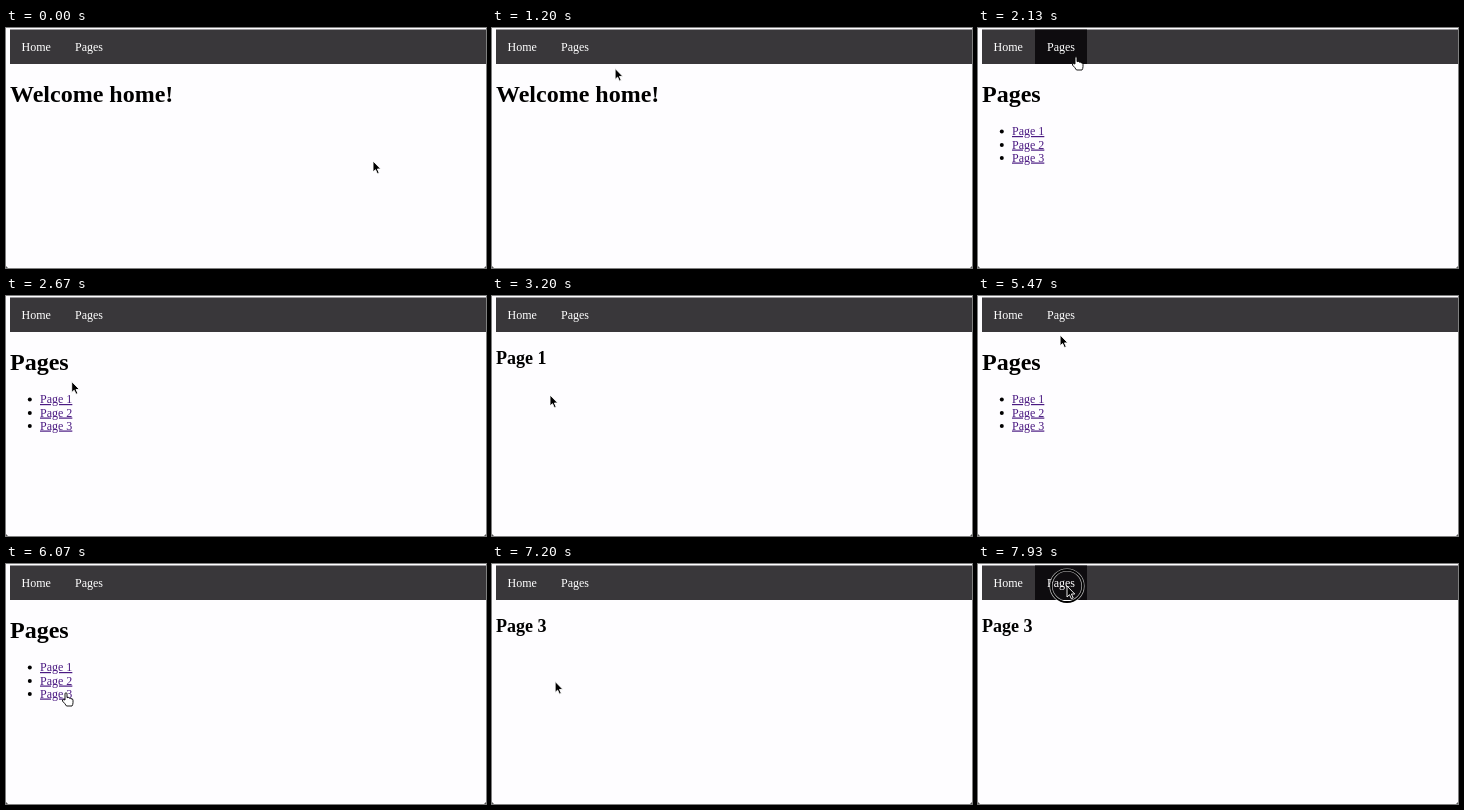
An HTML page for the animation above (8 s loop, 480 by 240 pixels).

```html
<!DOCTYPE html>
<html lang="en">
<head>
<meta charset="utf-8">
<title>Page navigation</title>
<style>
  html, body { margin: 0; width: 100%; height: 100%; overflow: hidden; background: #fefdff; }
  svg { display: block; width: 480px; height: 240px; font: 12px "Liberation Serif", Times, serif; }
  .nav { fill: #fff; }
  h1, .h1 { font-size: 24px; font-weight: bold; }
  .h2 { font-size: 18px; font-weight: bold; }
  .link { fill: #4b1a82; text-decoration: underline; }
</style>
</head>
<body>
<svg viewBox="0 0 480 240">
  <rect width="480" height="240" fill="#fefdff"/>
  <rect x="4" y="1.5" width="476" height="34.5" fill="#39373a"/>
  <rect id="hover" y="1.5" height="34.5" fill="#0e0c0f"/>
  <text class="nav" x="15.6" y="23">Home</text>
  <text class="nav" x="69" y="23">Pages</text>

  <g id="home"><text class="h1" x="4" y="73.5">Welcome home!</text></g>
  <g id="pages">
    <text class="h1" x="4" y="73.5">Pages</text>
    <circle cx="23.8" cy="103.5" r="2"/><text class="link" x="34" y="107">Page 1</text>
    <circle cx="23.8" cy="117" r="2"/><text class="link" x="34" y="120.5">Page 2</text>
    <circle cx="23.8" cy="130" r="2"/><text class="link" x="34" y="133.5">Page 3</text>
  </g>
  <g id="page1"><text class="h2" x="4" y="68">Page 1</text></g>
  <g id="page3"><text class="h2" x="4" y="68">Page 3</text></g>

  <path d="M0 238V240H2ZM480 238V240H478Z" fill="#555"/>

  <g id="pointer">
    <g id="ring" fill="none">
      <circle stroke="#fff" stroke-opacity=".7" stroke-width="3.2"/>
      <circle stroke="#000" stroke-width="1.8"/>
    </g>
    <path id="arrow" d="M0 0V11L2.5 8.7 4.3 12.7 6.2 11.9 4.4 8H7.8Z" stroke="#fff" stroke-width=".9"/>
    <path id="hand" d="M-1 7V.8a1 1 0 0 1 2 0V4.6Q3 4 3.4 5.2 5 4.6 5.3 6 7 5.6 7 7.2V9.5Q7 11.5 6 13H.5Q-1 10.5-3.6 8-3.8 6.2-2.2 6.6Z"
      fill="#fff" stroke="#000" stroke-width=".9"/>
  </g>
</svg>
<script>
const LOOP = 8000, STEP = 1000 / 15;   // the picture advances 15 times a second
const $ = id => document.getElementById(id);
const show = (id, on) => $(id).style.display = on ? '' : 'none';

// All times below are in steps.
const start = { x: 367, y: 133 };
const moves = [
  { from: 9, to: 21.6, x: 98, y: 29, bend: 6 },
  { from: 33, to: 44, x: 58, y: 99 },
  { from: 57, to: 67, x: 85, y: 27 },
  { from: 78, to: 91, x: 60, y: 129 },
  { from: 105, to: 115, x: 89, y: 22 },
];
const clicks = [
  { press: 23, release: 27, page: 'pages' },
  { press: 45, release: 47, page: 'page1' },
  { press: 68, release: 71, page: 'pages' },
  { press: 92, release: 95, page: 'page3' },
  { press: 116, release: 119, page: 'pages' },
];
const RESUME = 5;                      // steps until the hand returns after a click

const ease = u => u < .5 ? 4 * u ** 3 : 1 - 4 * (1 - u) ** 3;

function pointerAt(k) {
  let { x, y } = start;
  for (const m of moves) {
    if (k <= m.from) break;
    const p = ease(Math.min(1, (k - m.from) / (m.to - m.from)));
    x += (m.x - x) * p;
    y += (m.y - y) * p + (m.bend || 0) * Math.sin(Math.PI * p);
  }
  return { x, y };
}

function ringRadius(k) {
  const click = clicks.find(c => k >= c.press && k <= c.release);
  if (!click) return 0;
  return k === click.press || k === click.release ? 16 : 22.5;
}

function draw(time) {
  const k = Math.floor(time % LOOP / STEP + .06);
  const { x, y } = pointerAt(k);
  const page = clicks.reduce((p, c) => k > c.release ? c.page : p, 'home');
  for (const id of ['home', 'pages', 'page1', 'page3']) show(id, id === page);

  const onNav = y > 1 && y < 36 && x > 4 && x < 109;
  const onLink = page === 'pages' && x > 34 && x < 66 && y > 96 && y < 137;
  const loading = clicks.some(c => k >= c.release && k < c.release + RESUME);
  const hand = (onNav || onLink) && !loading;
  show('hover', onNav);
  $('hover').setAttribute('x', x < 57 ? 4 : 57);
  $('hover').setAttribute('width', x < 57 ? 53 : 52);
  show('hand', hand);
  show('arrow', !hand);

  const radius = ringRadius(k);
  show('ring', radius);
  for (const circle of $('ring').children) circle.setAttribute('r', radius);
  $('pointer').setAttribute('transform', `translate(${x} ${y})`);
}

const begin = performance.now();
function tick() {
  draw(performance.now() - begin);
  requestAnimationFrame(tick);
}
tick();
</script>
</body>
</html>
```
